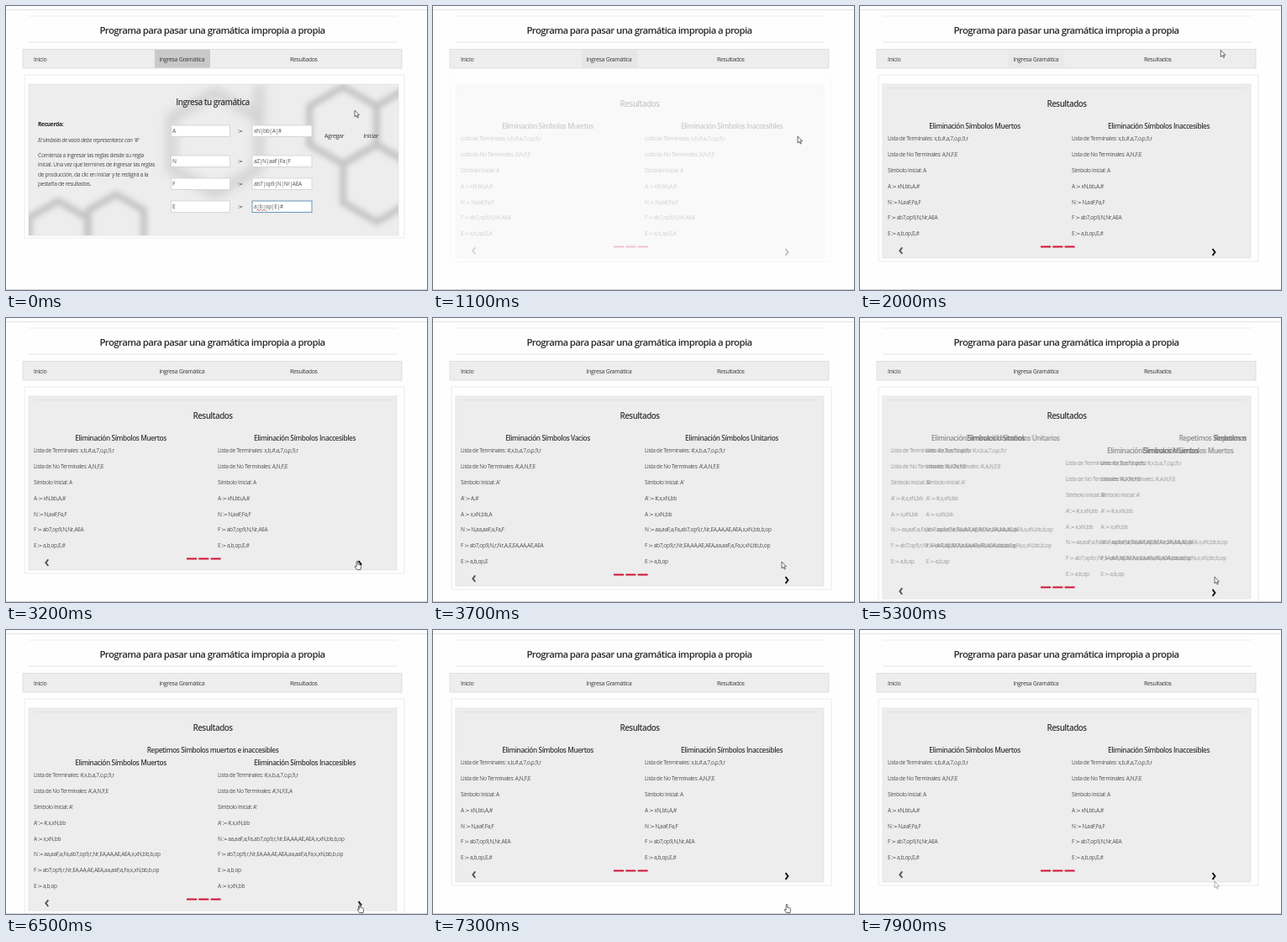
Recreate the animation shown at these times as an HTML page. Size 501x338 px, loop 8000 ms.

```html
<!DOCTYPE html>
<html lang="es">
<head>
<meta charset="utf-8">
<title>Gramática propia</title>
<style>
  html, body { margin: 0; width: 100%; height: 100%; overflow: hidden; background: #fff; }
  svg { display: block; width: 501px; height: 338px; }
  text { font-family: "Open Sans", "Noto Sans", sans-serif; letter-spacing: -.05em; fill: #3a3a3a; white-space: pre; }
  .title { font-size: 11.35px; font-weight: 600; text-anchor: middle; fill: #2a2a2a; }
  .nav { font-size: 7.05px; }
  .heading { font-size: 9.8px; font-weight: 600; text-anchor: middle; }
  .column { font-size: 8.25px; font-weight: 600; text-anchor: middle; }
  .row { font-size: 6.55px; fill: #505050; }
  .note { font-size: 6.7px; fill: #4a4a4a; }
  .bold { font-weight: 700; fill: #222; }
  .italic { font-style: italic; }
  .input { fill: #fff; stroke: #d0d0d0; stroke-width: .8; }
  .focused { stroke: #6f9cbd; stroke-width: 1.1; }
  .panel { fill: #ededed; stroke: #e0e0e0; stroke-width: .8; }
  .frame { fill: none; stroke: #e6e6e6; stroke-width: .8; }
  .chevron { fill: none; stroke-width: 1.9; }
</style>
</head>
<body>
<svg id="stage" viewBox="0 0 501 338"></svg>
<script>
const SLIDE_WIDTH = 427, SLIDE_TIME = 400, LOOP = 8000;
const SLIDE_STARTS = [3300, 5100, 6900];
const EXTRA_HEIGHT = [0, 19, 34, 0];

const label = (cls, x, y, s) => `<text class="${cls}" x="${x}" y="${y}">${s}</text>`;
const box = (cls, x, y, w, h, id = '') =>
  `<rect ${id && `id="${id}"`} class="${cls}" x="${x}" y="${y}" width="${w}" height="${h}"/>`;
const line = (y, color, x1 = 0, x2 = 501) =>
  `<path d="M${x1} ${y}H${x2}" stroke="${color}" stroke-width=".9"/>`;

function hexagon([cx, cy, r]) {
  const corners = [0, 1, 2, 3, 4, 5].map(i => {
    const a = (i + .5) * Math.PI / 3;
    return `${cx + r * Math.cos(a)},${cy + r * Math.sin(a)}`;
  });
  return `<polygon points="${corners.join(' ')}"/>`;
}

// Grammar form
const rules = [['A', 'xN|bb|A|#', 142], ['N', 'aZ|N|aaF|Fa|F', 178],
  ['F', 'ab7|op9|N|Nr|AEA', 205], ['E', 'a|b|op|E|#', 232]];
const ruleRow = ([name, body, y]) =>
  box('input', 196.5, y, 70, 13.5) + label('row', 198, y + 9, name) +
  label('nav', 276, y + 9, ':=') +
  box(name === 'E' ? 'input focused' : 'input', 293, y, 71, 13.5) + label('row', 295, y + 9, body);

const hexagons = [[401, 142, 46], [441, 211, 46], [481, 142, 46], [62, 272, 40], [131, 262, 38]];
const notes = ['Comienza a ingresar las reglas desde su regla',
  'inicial. Una vez que termines de ingresar las reglas',
  'de producción, da clic en iniciar y te redigirá a la', 'pestaña de resultados.'];

const form = `
  ${box('frame', 22, 82, 452, 194)}${box('panel', 27, 93, 440, 180)}
  <g clip-path="url(#formClip)" fill="none" stroke="#c4c4c4">
    <g stroke-width="8" filter="url(#soft)">${hexagons.map(hexagon).join('')}</g>
    <g stroke-width="12" stroke="#d2d2d2" filter="url(#softer)">${hexagon([249, 163, 60])}<path d="M301 133V93"/></g>
  </g>
  ${label('heading', 246, 118, 'Ingresa tu gramática')}
  ${label('note bold', 38, 142.5, 'Recuerda:')}
  ${label('note italic', 38, 162, "El símbolo de vacío debe representarse con '#'")}
  ${notes.map((s, i) => label('note', 38, 180 + i * 11.4, s)).join('')}
  ${rules.map(ruleRow).join('')}
  <path d="M298 243q1-1.5 2 0t2 0 2 0 2 0 2 0 2 0" fill="none" stroke="#e04848" stroke-width=".7"/>
  ${label('nav', 379, 157, 'Agregar')}${label('nav', 425.5, 157, 'Iniciar')}`;

// Result slides
const column = (title, terminals, others, initial, ...productions) => ({
  title: 'Eliminación Símbolos ' + title,
  rows: ['Lista de Terminales: ' + terminals, 'Lista de No Terminales: ' + others,
    'Símbolo Inicial: ' + initial, ...productions]
});
const firstStep = title => column(title, 'x,b,#,a,7,o,p,9,r', 'A,N,F,E', 'A', 'A := xN,bb,A,#',
  'N := N,aaF,Fa,F', 'F := ab7,op9,N,Nr,AEA', 'E := a,b,op,E,#');

const terminals = '#,x,b,a,7,o,p,9,r', start = "A' := #,x,xN,bb", ruleA = 'A := x,xN,bb', ruleE = 'E := a,b,op';
const ruleN = 'N := aa,aaF,a,Fa,ab7,op9,r,Nr,EA,AA,AE,AEA,x,xN,bb,b,op';
const ruleF = 'F := ab7,op9,r,Nr,EA,AA,AE,AEA,aa,aaF,a,Fa,x,xN,bb,b,op';
const reduced = title => column(title, terminals, "A',A,N,F,E", "A'", start, ruleA, ruleN, ruleF, ruleE);

const opening = { columns: [firstStep('Muertos'), firstStep('Inaccesibles')] };
const slides = [
  opening,
  { columns: [
    column('Vacios', terminals, "A',A,N,F,E", "A'", "A' := A,#", 'A := x,xN,bb,A', 'N := N,aa,aaF,a,Fa,F',
      'F := ab7,op9,N,r,Nr,A,E,EA,AA,AE,AEA', 'E := a,b,op,E'),
    reduced('Unitarios')] },
  { banner: 'Repetimos Símbolos muertos e inaccesibles',
    columns: [reduced('Muertos'),
      column('Inaccesibles', terminals, "A',N,F,E,A", "A'", start, ruleN, ruleF, ruleE, ruleA)] },
  opening
];

function slideMarkup({ banner, columns }, index) {
  const shift = banner ? 15 : 0;
  const body = columns.map((c, i) =>
    label('column', 136.5 + i * 219, 146 + shift, c.title) +
    c.rows.map((s, r) => label('row', 33 + i * 219, 160.3 + shift + r * 18.8, s)).join('')).join('');
  return `<g transform="translate(${index * SLIDE_WIDTH} 0)">
    ${banner ? label('column', 246, 146, banner) : ''}${body}</g>`;
}
const track = slides.map(slideMarkup).join('');

const results = `
  ${box('frame', 22, 82, 452, 222, 'outer')}${box('panel', 27, 93, 438, 207, 'inner')}
  ${line(97.5, '#e0e0e0', 32, 460)}
  ${label('heading', 246, 119.5, 'Resultados')}
  <g clip-path="url(#trackClip)"><g id="trail">${track}</g><g id="track">${track}</g></g>
  <g id="controls">
    <path d="M215 286.5h12m2.3 0h12m2.3 0h12" stroke="#cf1235" stroke-width="1.8"/>
    <path class="chevron" d="M50.3 287.4l-3 3.8 3 3.8" stroke="#555"/>
    <path class="chevron" d="M419.5 289.2l3 3.8-3 3.8" stroke="#111"/>
  </g>`;

stage.innerHTML = `
  <defs>
    <clipPath id="formClip">${box('', 27, 93, 440, 180)}</clipPath>
    <clipPath id="trackClip">${box('', 33, 130, 427, 208)}</clipPath>
    <filter id="soft"><feGaussianBlur stdDeviation="3"/></filter>
    <filter id="softer" x="-30%" y="-30%" width="160%" height="160%"><feGaussianBlur stdDeviation="6"/></filter>
  </defs>
  <rect width="501" height="338" fill="#fefefe"/>
  ${line(4.5, '#dfe3e3')}${line(12, '#e9e9e9', 27, 466)}${line(43, '#e2e2e2', 27, 466)}
  ${label('title', 245.5, 33, 'Programa para pasar una gramática impropia a propia')}
  <rect x="20" y="51.5" width="451" height="22.5" fill="#ededed" stroke="#dadada" stroke-width=".8"/>
  <rect id="tab" x="177" y="52" width="66" height="21.5" fill="#c9c9c9"/>
  ${label('nav', 33, 65.5, 'Inicio')}${label('nav', 182.5, 65.5, 'Ingresa Gramática')}${label('nav', 338, 65.5, 'Resultados')}
  <g id="form">${form}</g>
  <g id="results">${results}</g>
  ${line(337.5, '#cfcfcf')}
  <g id="cursor" fill="#fff" stroke="#444" stroke-width=".8" stroke-linejoin="round">
    <path id="arrow" d="M0 0v8l1.9-1.7 1.3 2.8 1.2-.6-1.3-2.7h2.4z"/>
    <path id="hand" d="M-.8 .8q.9-1.4 1.6 0v3.4l3 .8q1 .3.8 1.6l-.6 3.9h-4.4l-2.6-3.6q.2-1.4 2.2.2z"/>
  </g>`;

const el = id => document.getElementById(id);
const clamp = v => Math.min(1, Math.max(0, v));
const ramp = (t, from, to) => clamp((t - from) / (to - from));
const ease = v => (1 - Math.cos(Math.PI * v)) / 2;

const slidePosition = t =>
  SLIDE_STARTS.reduce((sum, s) => sum + ease(ramp(t, s, s + SLIDE_TIME)), 0);

// time, x, y
const cursorPath = [[0, 415, 124], [100, 415, 124], [450, 436, 146], [900, 434, 155], [1150, 434, 155],
  [1500, 438, 70], [1850, 428, 38], [2100, 430, 60], [2700, 421, 276], [3000, 418, 289], [3300, 418, 289],
  [3600, 415, 290], [3900, 415, 290], [4200, 414, 291], [4500, 415, 291], [5000, 421, 307],
  [5300, 422, 308], [5900, 421, 326], [7850, 421, 326]];
const handTimes = [[2850, 3380], [4800, 5180], [5800, 7850]];

function cursorAt(t) {
  if (t >= 7850) return [422, 299];
  const i = cursorPath.findIndex(k => k[0] > t);
  const [t0, x0, y0] = cursorPath[i - 1], [t1, x1, y1] = cursorPath[i];
  const p = ease(ramp(t, t0, t1));
  return [x0 + (x1 - x0) * p, y0 + (y1 - y0) * p];
}

function render(t) {
  el('form').setAttribute('opacity', 1 - ramp(t, 950, 1050));
  el('results').setAttribute('opacity', ramp(t, 1050, 1250));
  el('tab').setAttribute('opacity', t < 1000 ? 1 : .2 * (1 - ramp(t, 1100, 3100)) + .8 * (1 - ramp(t, 1000, 1100)));

  const pos = slidePosition(t), moving = pos % 1 > 0;
  el('track').setAttribute('transform', `translate(${-pos * SLIDE_WIDTH} 0)`);
  el('trail').setAttribute('transform', `translate(${-slidePosition(t - 25) * SLIDE_WIDTH} 0)`);
  el('track').setAttribute('opacity', moving ? .55 : 1);
  el('trail').setAttribute('opacity', moving ? .55 : 0);

  const extra = Math.max(EXTRA_HEIGHT[Math.floor(pos)], EXTRA_HEIGHT[Math.ceil(pos)]);
  el('outer').setAttribute('height', 222 + extra);
  el('inner').setAttribute('height', 207 + extra);
  el('controls').setAttribute('transform', `translate(0 ${extra})`);

  const hand = handTimes.some(([from, to]) => t >= from && t < to);
  el('cursor').setAttribute('transform', `translate(${cursorAt(t)})`);
  el('cursor').setAttribute('opacity', t >= 7850 ? .5 : 1);
  el('hand').setAttribute('visibility', hand ? 'visible' : 'hidden');
  el('arrow').setAttribute('visibility', hand ? 'hidden' : 'visible');
}

const began = performance.now();
function tick() {
  render((performance.now() - began) % LOOP);
  requestAnimationFrame(tick);
}
tick();
</script>
</body>
</html>
```
